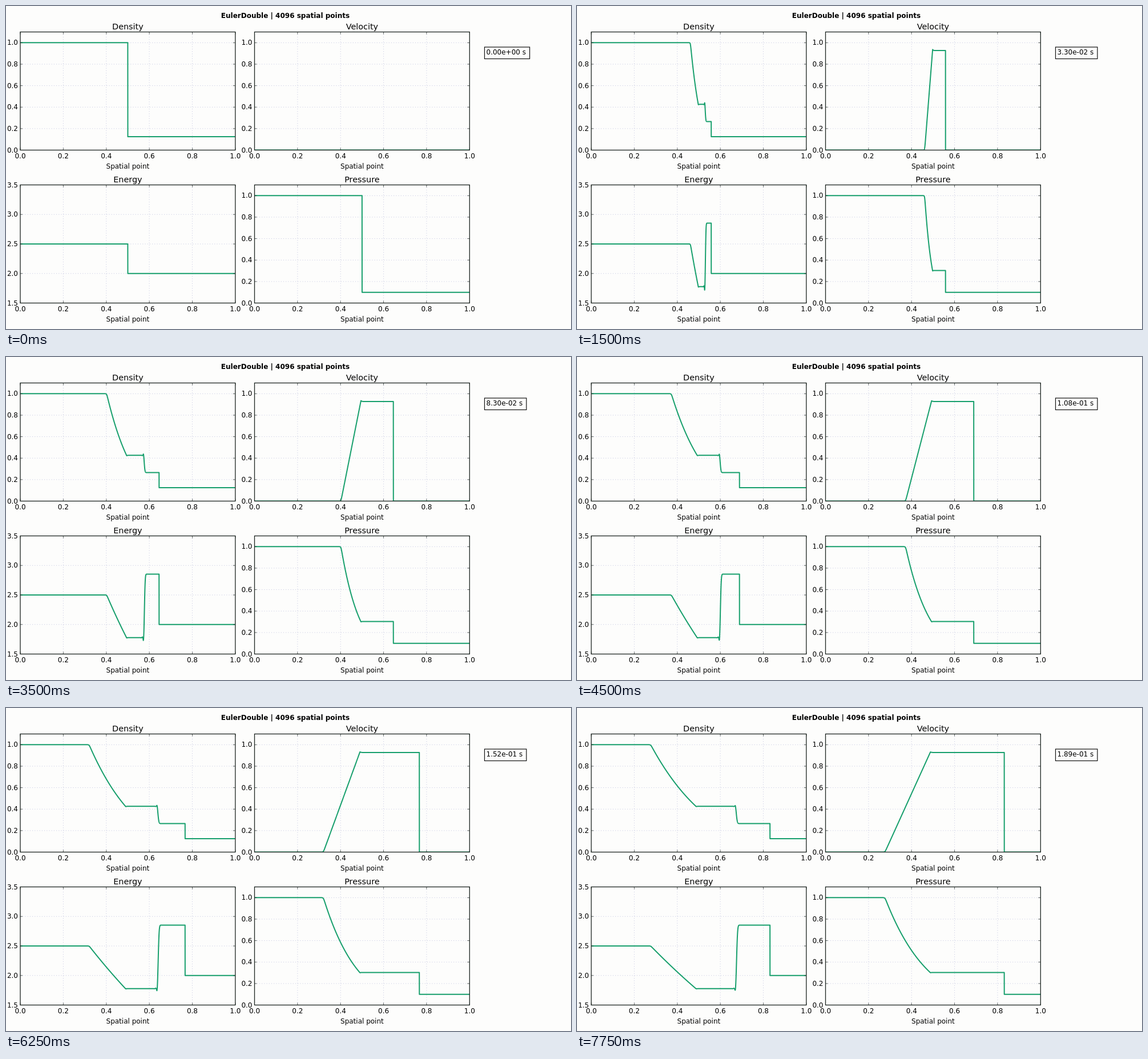
Animation, 990 px wide and 566 px high, one loop 8 s. Source, as an HTML page with a canvas:

```html
<!DOCTYPE html>
<html>
<head>
<meta charset="utf-8">
<style>
html, body { margin: 0; width: 990px; height: 566px; overflow: hidden; background: #fdfdfc; }
canvas { display: block; }
</style>
</head>
<body>
<canvas id="stage" width="990" height="566"></canvas>
<script>
const ctx = document.getElementById('stage').getContext('2d');
const FONT = '"DejaVu Sans", sans-serif';
const W = 376.8, H = 207, POINTS = 4096;

const unitTicks = [0, 0.2, 0.4, 0.6, 0.8, 1];
const panels = [
  { title: 'Density', key: 'rho', x: 25, y: 45.5, min: 0, max: 1.1, ticks: unitTicks },
  { title: 'Velocity', key: 'u', x: 435.5, y: 45.5, min: 0, max: 1.1, ticks: unitTicks },
  { title: 'Energy', key: 'e', x: 25, y: 313.5, min: 1.5, max: 3.5, ticks: [1.5, 2, 2.5, 3, 3.5] },
  { title: 'Pressure', key: 'p', x: 435.5, y: 313.5, min: 0, max: 1.1, ticks: unitTicks }
];

// Sod shock tube, gamma = 1.4, with the slight smearing of a numerical scheme
const SOUND = Math.sqrt(1.4), U_STAR = 0.92745, SHOCK = 1.7522, RHO_RIGHT = 0.26557;

function gas(x, t) {
  let u = 0, rho = 0.125, p = 0.1;
  const right = x > 0.5 + SHOCK * t;
  if (!right && t === 0) {
    rho = p = 1;
  } else if (!right) {
    const spread = Math.cbrt(t);
    const width = 0.0122 * spread, round = 0.0035 * spread;
    const tail = 0.5 + (1.2 * U_STAR - SOUND) * t;
    const edge = 0.5 + U_STAR * t - 0.88 * width;
    const z = (x - 0.5 + SOUND * t) / round;
    const fan = 5 / 6 * round / t * (z > 30 ? z : Math.log1p(Math.exp(z)));
    const overshoot = (0.013 - 0.035 * t) * Math.exp(-Math.max(0, x - tail) / (0.6 * width));
    u = Math.min(fan, U_STAR + overshoot);
    const c = 1 - 0.2 * u / SOUND;
    rho = c ** 5;
    p = c ** 7;
    const d = (x - edge) / width;
    if (d > 0) {
      rho = RHO_RIGHT + (rho + 0.016 - 0.05 * t - RHO_RIGHT) * Math.exp(-d * d);
    } else {
      rho += (0.016 - 0.05 * t) * Math.exp(d / 0.6) * Math.cos(Math.PI * d);
    }
  }
  return { rho, u, p, e: p / (0.4 * rho) };
}

function text(str, x, y, align = 'center', font = '12px ') {
  ctx.font = font + FONT;
  ctx.textAlign = align;
  ctx.fillStyle = '#000';
  ctx.fillText(str, x, y);
}

function line(x1, y1, x2, y2) {
  ctx.beginPath();
  ctx.moveTo(x1, y1);
  ctx.lineTo(x2, y2);
  ctx.stroke();
}

function drawPanel(panel, samples) {
  const { x, y, min, max, ticks, key } = panel;
  const px = v => x + v * W;
  const py = v => y + H * (max - v) / (max - min);

  ctx.strokeStyle = '#c9cbe2';
  ctx.lineWidth = 1;
  ctx.setLineDash([1.2, 3]);
  unitTicks.slice(1, -1).forEach(v => line(px(v), y + H, px(v), y));
  ticks.forEach(v => line(x, py(v), x + W, py(v)));
  ctx.setLineDash([]);

  ctx.save();
  ctx.beginPath();
  ctx.rect(x, y, W, H);
  ctx.clip();
  ctx.beginPath();
  samples.forEach((s, i) => ctx.lineTo(px(i / (POINTS - 1)), py(s[key])));
  ctx.strokeStyle = '#179f6c';
  ctx.lineWidth = 2;
  ctx.lineJoin = 'round';
  ctx.stroke();
  ctx.restore();

  ctx.strokeStyle = '#1c2420';
  ctx.lineJoin = 'miter';
  ctx.lineWidth = 0.7;
  for (const v of unitTicks) {
    line(px(v), y, px(v), y + 4);
    line(px(v), y + H, px(v), y + H - 4);
    text(v.toFixed(1), px(v), y + H + 14.5);
  }
  for (const v of ticks) {
    line(x, py(v), x + 4, py(v));
    line(x + W, py(v), x + W - 4, py(v));
    text(v.toFixed(1), x - 4, py(v) + 4, 'right');
  }
  ctx.lineWidth = 1.3;
  ctx.strokeRect(x, y, W, H);
  text(panel.title, x + W / 2, y - 5, 'center', '14.4px ');
  text('Spatial point', x + W / 2, y + H + 32);
}

function draw(step) {
  const t = Math.max(0, Math.floor(6.25 * step - 4)) / 1000;
  const samples = Array.from({ length: POINTS }, (_, i) => gas(i / (POINTS - 1), t));
  ctx.fillStyle = '#fdfdfc';
  ctx.fillRect(0, 0, 990, 566);
  text('EulerDouble | 4096 spatial points', 489.5, 21, 'center', 'bold 12px ');
  panels.forEach(panel => drawPanel(panel, samples));

  const label = t.toExponential(2).replace(/e([+-])/, (_, sign) => `e${sign}0`) + ' s';
  text(label, 841.5, 85, 'left');
  ctx.lineWidth = 1.2;
  ctx.strokeStyle = '#111';
  ctx.strokeRect(838.5, 72, ctx.measureText(label).width + 9.6, 20.5);
}

let shown = -1;
function tick() {
  const step = Math.floor(performance.now() % 8000 / 250);
  if (step !== shown) draw(shown = step);
  requestAnimationFrame(tick);
}
tick();
</script>
</body>
</html>
```
